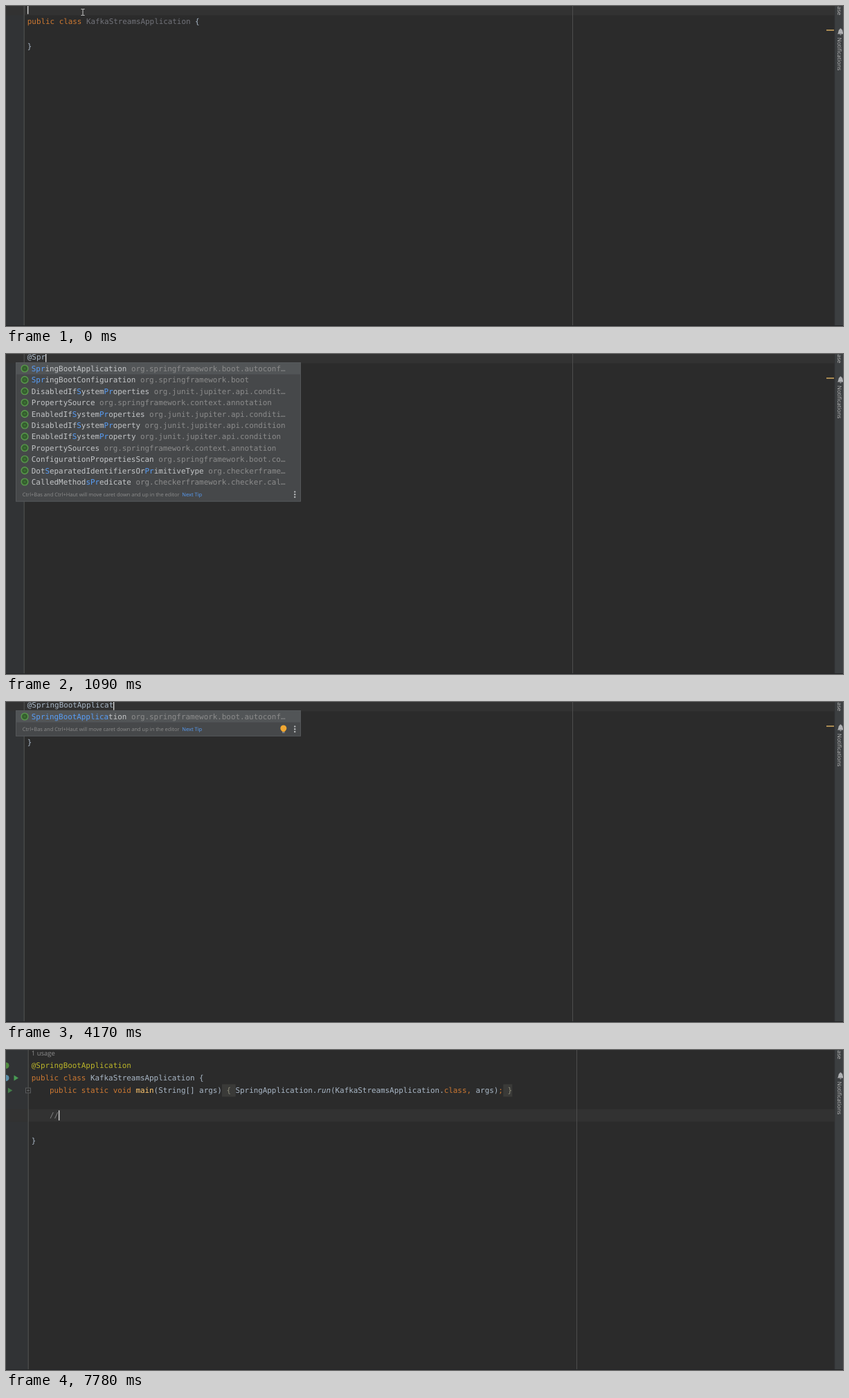
Animation of 1209x463 px, one loop 8 s. Source, as an HTML page:

```html
<!DOCTYPE html>
<html lang="en">
<head>
<meta charset="utf-8">
<title>Code completion</title>
<style>
  html, body { margin: 0; height: 100%; overflow: hidden; background: #2b2b2b; }
  svg { display: block; width: 1209px; height: 463px; }
  text { white-space: pre; text-rendering: geometricPrecision; }
  .code { font: 10.88px "DejaVu Sans Mono", monospace; fill: #a9b7c6; }
  .ui { font: 7.5px "Open Sans", sans-serif; fill: #8c8c8c; }
  .side { font-size: 8.1px; fill: #bbb; }
  .name { fill: #c4c6c8; }
  .pkg { fill: #8c8c8c; }
  .hit, .link { fill: #589df6; }
  .key { fill: #cc7832; }
  .dim { fill: #72737a; }
  .note { fill: #bbb529; }
  .bad { fill: #bc3f3c; }
  .fn { fill: #ffc66d; }
  .it { font-style: italic; }
  .fold { fill: #8c8c7a; }
  .com { fill: #808080; }
</style>
</head>
<body>
<svg id="stage" viewBox="0 0 1209 463"></svg>
<script>
const LOOP = 8000, CW = 6.552, ROW = 16.4, TOP = 12.8;
const WORD = '@SpringBootApplication';

// Brackets mark letters matched inside a name.
const MATCHES = `SpringBootApplication org.springframework.boot.autoconf…
SpringBootConfiguration org.springframework.boot
DisabledIf[S]ystem[Pr]operties org.junit.jupiter.api.condit…
PropertySource org.springframework.context.annotation
EnabledIf[S]ystem[Pr]operties org.junit.jupiter.api.conditi…
DisabledIf[S]ystem[Pr]operty org.junit.jupiter.api.condition
EnabledIf[S]ystem[Pr]operty org.junit.jupiter.api.condition
PropertySources org.springframework.context.annotation
ConfigurationPropertiesScan org.springframework.boot.co…
Dot[S]eparatedIdentifiersOr[Pr]imitiveType org.checkerframe…
CalledMethod[sPr]edicate org.checkerframework.checker.cal…`.split('\n');

const LISTS = {
  all: `SpringBootApplication org.springframework.boot.autoconf…
Override java.lang
Deprecated java.lang
EnableAutoConfiguration org.springframework.boot.autoco…
A org.checkerframework.checker.units.qual
FunctionalInterface java.lang
SuppressWarnings java.lang
StackTrace jdk.jfr
BottomVal org.checkerframework.common.value.qual
C org.checkerframework.checker.units.qual
ConditionalOnDefaultWebSecurity org.springframework.boo…
ConditionalOnExpression org.springframework.boot.autoco…`.split('\n'),
  spr: MATCHES,
  spri: [0, 1, 2, 4, 8, 9, 10].map(i => MATCHES[i]),
  two: MATCHES.slice(0, 2),
  one: MATCHES.slice(0, 1)
};

// time, letters typed, letters matched in the list, list
const TYPING = [
  [0, 0, 0, ''], [270, 1, 0, ''], [480, 1, 0, 'all'],
  [610, 2, 0, 'all'], [680, 2, 1, 'all'], [820, 3, 2, 'spr'],
  [960, 4, 2, 'spr'], [1030, 4, 3, 'spr'], [1220, 5, 4, 'spri'],
  [1570, 6, 4, 'spri'], [1640, 6, 5, 'two'], [1840, 7, 6, 'two'],
  [2370, 8, 7, 'two'], [2630, 9, 8, 'two'], [2760, 10, 9, 'two'],
  [2830, 11, 9, 'two'], [2900, 11, 10, 'two'],
  [3160, 12, 10, 'two'], [3230, 12, 11, 'one'], [3300, 13, 12, 'one'],
  [3430, 14, 13, 'one'], [3560, 15, 14, 'one'], [3700, 16, 15, 'one'],
  [3840, 17, 16, 'one'], [3970, 18, 16, 'one'], [4040, 18, 17, 'one'],
  [4170, 19, 17, 'one'], [4240, 20, 19, 'one'], [4440, 21, 20, 'one'],
  [4640, 22, 21, 'one'], [5230, 22, 0, '']
];

const stage = document.getElementById('stage');
const rect = (x, y, w, h, fill, more = '') =>
  `<rect x="${x}" y="${y}" width="${w}" height="${h}" fill="${fill}" ${more}/>`;
const circle = (x, y, r, fill, more = '') =>
  `<circle cx="${x}" cy="${y}" r="${r}" fill="${fill}" ${more}/>`;
const path = (d, fill, more = '') => `<path d="${d}" fill="${fill}" ${more}/>`;
const text = (x, y, cls, s, more = '') =>
  `<text x="${x}" y="${y}" class="${cls}" ${more}>${s}</text>`;
const span = (cls, s) => `<tspan class="${cls}">${s}</tspan>`;
const mid = line => 4.4 + 18.05 * line;
const play = (x, y, fill) => path(`M${x} ${y - 4}l6.5 4l-6.5 4z`, fill);

const classLine = cls =>
  span('key', 'public class ') + span(cls, 'KafkaStreamsApplication') + ' {';
const mainLine = '    ' + span('key', 'public static void ') + span('fn', 'main') +
  '(String[] args)' + span('fold', ' { ') + 'SpringApplication.' + span('it', 'run') +
  '(KafkaStreamsApplication.' + span('key', 'class') + span('key', ',') + ' args)' +
  span('key', ';') + span('fold', ' }');

function typedWord(n, t) {
  if (t >= 5300) return span('note', WORD);
  if (t >= 4640) return '@' + span('bad', WORD.slice(1));
  return WORD.slice(0, n);
}

// Lines of code, caret place and gutter for a given time.
function editor(t, n) {
  const word = typedWord(n, t);
  if (t < 5840) {
    const down = t >= 5570;
    return { lines: [word, classLine(t < 5300 ? 'dim' : ''), '', '}'],
      line: down ? 1 : 0, col: down ? 38 : n };
  }
  if (t < 6300) return { lines: [word, classLine(''), '', '', '}'], line: 2, col: 4 };
  const slashes = t >= 7780 ? '//' : t >= 7580 ? '/' : '';
  const lines = [word, classLine(''), mainLine];
  if (t >= 7180) lines.push('');
  if (t >= 7380) lines.push('    ' + span('com', slashes));
  lines.push('', '}');
  const usage = t >= 6580;
  if (usage) lines.unshift('');
  const main = usage ? 3 : 2;
  const line = t < 7180 ? main : t < 7380 ? 4 : 5;
  return { lines, usage, main, line, col: t < 7180 ? 106 : 4 + slashes.length };
}

function drawEditor(t, n) {
  const { lines, line, col, main, usage } = editor(t, n);
  const shift = main ? 6 : 0, x0 = 30.8 + shift, edge = 26 + shift;
  let s = rect(0, 0, edge, 463, '#313335') +
    rect(0, mid(line) - 9, 1197, 18, '#323232') +
    rect(edge - .3, 0, 1, 463, '#555755') +
    rect(818 + shift, 0, 1, 463, '#4d4d4d');
  if (main) {
    const y = mid(main);
    for (const [c, w] of [[42, 3], [104, 2]])
      s += rect(x0 + c * CW, y - 9, w * CW, 18, '#3a3a38');
    s += rect(28.5, y - 3.5, 7, 7, '#2b2b2b', 'stroke="#5a5c5e"') +
      path(`M30 ${y}h4M32 ${y - 2}v4`, 'none', 'stroke="#6e7072" stroke-width=".8"');
  }
  if (usage) {
    s += text(36.8, 8.2, 'ui', '1 usage', 'style="font-size:9.5px"') +
      circle(0, mid(1), 4.5, '#4f8a3f') + circle(0, mid(2), 4.5, '#5b8fa8') +
      play(11.5, mid(2), '#499c54');
    if (t >= 7180) s += play(2.8, mid(3), '#437c49');
  }
  lines.forEach((l, i) => { if (l) s += text(x0, mid(i) + 3.8, 'code', l); });
  s += rect(Math.round(x0 + col * CW), mid(line) - 7.3, 1.3, 14.6, '#dcdcdc');
  if (t < 5300) s += rect(1185, 34, 11, 2, '#a98a52');
  if (t >= 4640 && t < 5300) s += rect(1185, 21, 11, 2, '#9e2927');
  if (t < 270)
    s += path('M108.5 4.5h2l.5.5l.5-.5h2M111 5v8M108.5 13.5h2l.5-.5l.5.5h2', 'none', 'stroke="#c8c8c8"');
  return s;
}

function label(row, hits) {
  const [name, pkg] = row.split(' ');
  const head = WORD.slice(1, hits + 1);
  const marked = head && name.startsWith(head)
    ? span('hit', head) + name.slice(hits)
    : name.replace(/\[(\w+)\]/g, (_, m) => hits ? span('hit', m.slice(0, hits)) + m.slice(hits) : m);
  return span('name', marked) + ' ' + span('pkg', pkg);
}

function drawPopup(list, hits) {
  if (!list) return '';
  const rows = LISTS[list], all = list === 'all';
  const end = TOP + (all ? 11.5 : rows.length) * ROW, bottom = end + 20;
  let s = rect(14.5, 12.5, 411, bottom - 12.5, '#46484a', 'stroke="#55585a"') +
    rect(15, 13, 410, ROW, '#525557') +
    `<clipPath id="list"><rect x="15" y="12" width="410" height="${end - 12}"/></clipPath><g clip-path="url(#list)">`;
  rows.forEach((row, i) => {
    const y = TOP + ROW * (i + .5);
    s += circle(27, y, 5, '#3b6e33', 'stroke="#5fa051" stroke-width="1.1"') +
      circle(27, y, 2.6, 'none', 'stroke="#2f4f2b" stroke-width="1"') +
      text(36.8, y + 3.9, 'code', label(row, hits));
  });
  s += '</g>';
  if (all) s += rect(417.5, 13, 6.5, 47, '#626466');
  const tip = all
    ? 'Press Ctrl+. to choose the selected (or first) suggestion and insert a dot afterwards'
    : 'Ctrl+Bas and Ctrl+Haut will move caret down and up in the editor';
  s += text(23.7, bottom - 7.3, 'ui', tip) +
    text(all ? 309.3 : 254.3, bottom - 7.3, 'ui link', 'Next Tip');
  const y = bottom - 10;
  for (const d of [-3.8, 0, 3.8]) s += circle(417.2, y + d, 1.2, '#b4b6b8');
  if (rows.length < 3)
    s += circle(400.8, y - 1.2, 4.5, '#f0a732') + rect(398.8, y + 2, 4, 1.8, '#f0a732') +
      rect(399, y + 4.3, 3.6, 1.2, '#9a9da0');
  return s;
}

const sidebar = rect(1197, 0, 12, 463, '#3c3f41') + rect(1196.5, 0, 1, 463, '#333537') +
  path('M1201 40.5c1.8-1.6 1-6.6 3.7-7.2v-.9h1.6v.9c2.7.6 1.9 5.6 3.7 7.2zM1204 41.3h3l-1.5 1.2z', '#afb1b3') +
  text(0, 0, 'ui side', 'ase', 'transform="translate(1201 13.3) rotate(90)" text-anchor="end"') +
  text(0, 0, 'ui side', 'Notifications', 'transform="translate(1201 45.8) rotate(90)"') +
  rect(0, 462, 1209, 1, '#222426');

function draw(t) {
  const [, n, hits, list] = TYPING.findLast(step => step[0] <= t);
  return rect(0, 0, 1209, 463, '#2b2b2b') + drawEditor(t, n) + drawPopup(list, hits) + sidebar;
}

let start, last;
function tick(now) {
  start ??= now;
  const picture = draw((now - start) % LOOP);
  if (picture !== last) stage.innerHTML = last = picture;
  requestAnimationFrame(tick);
}
requestAnimationFrame(tick);
</script>
</body>
</html>
```
